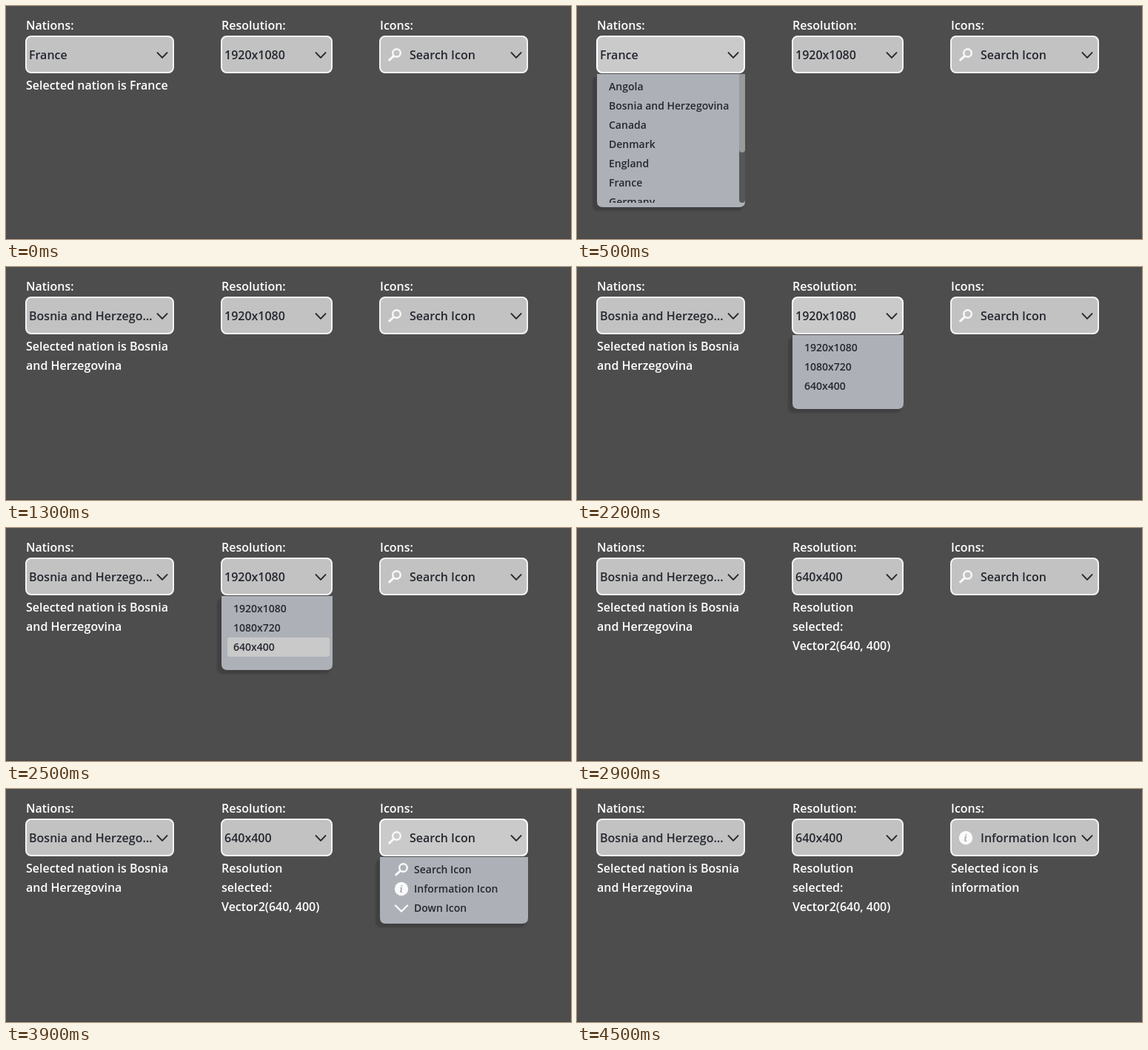
Recreate the animation shown at these times as an HTML page. Size 763 by 315 pixels, loop 6000 ms.

```html
<!DOCTYPE html>
<html lang="en">
<head>
<meta charset="utf-8">
<title>Option buttons</title>
<style>
  html, body { margin: 0; width: 100%; height: 100%; overflow: hidden; background: #4d4d4d; }
  svg { display: block; }
  text { font: 600 16px "Open Sans", sans-serif; fill: #fff; white-space: pre; }
  .dark { fill: #24282f; }
  .item { font-size: 14px; }
  .info { font: italic 700 13px "Noto Serif", serif; fill: #adb1b7; }
</style>
</head>
<body>
<svg id="stage" width="763" height="315" viewBox="0 0 763 315">
  <defs>
    <filter id="soft" x="-10%" y="-10%" width="120%" height="120%"><feGaussianBlur stdDeviation="1.2"/></filter>
    <clipPath id="list"><rect x="0" y="92" width="763" height="174"/></clipPath>
  </defs>
  <rect width="763" height="315" fill="#4d4d4d"/>
  <rect y="314" width="763" height="1" fill="#494445"/>
  <g id="scene"></g>
</svg>
<script>
const LOOP = 6000;
const ROW = 26;
const scene = document.getElementById('scene');

const text = (x, y, s, cls = '') => `<text x="${x}" y="${y}" class="${cls}">${s}</text>`;

const chevron = (x, y, w, h, color, weight) =>
  `<path d="M${x - w} ${y - h}L${x} ${y + h}L${x + w} ${y - h}" fill="none" stroke="${color}" ` +
  `stroke-width="${weight}" stroke-linecap="round" stroke-linejoin="round"/>`;

// Icons are centred on (x, y).
const icons = {
  search: (x, y) => `<g fill="none" stroke="#fafafa" stroke-linecap="round">
    <circle cx="${x + 2.5}" cy="${y - 2.5}" r="5.3" stroke-width="2.4"/>
    <path d="M${x - 1.8} ${y + 1.8}L${x - 7.3} ${y + 7}" stroke-width="3"/></g>`,
  info: (x, y) => `<circle cx="${x}" cy="${y}" r="9.2" fill="#fafafa"/>` + text(x - 2.8, y + 4.8, 'i', 'info'),
  down: (x, y) => chevron(x, y + 0.5, 8, 4, '#fafafa', 2.4)
};

function button(x, w, look, label, icon) {
  const hover = look === 'hover';
  return `<rect x="${x}" y="41" width="${w - 1}" height="49" rx="7" fill="${hover ? '#cacaca' : '#c2c2c2'}" ` +
    `stroke="${hover ? '#fff' : '#f3f3f3'}" stroke-width="2"/>` +
    (icon ? icons[icon](x + 20, 66) : '') +
    text(x + (icon ? 40 : 4), 72, label, 'dark') +
    chevron(x + w - 16, 66.5, 6.5, 3.4, '#26292e', 2);
}

function popup(x, w, h, items, active, scrolls) {
  const inner = scrolls ? w - 8 : w;
  const bottom = 92 + h;
  let out = `<rect x="${x - 6}" y="95" width="${w + 3}" height="${h + 2}" rx="8" fill="#3f3f3f" filter="url(#soft)"/>
    <path d="M${x} 92h${w}V${bottom - 8}q0 8 -8 8H${x + 8}q-8 0 -8 -8z" fill="#adb1b7"/>`;
  if (active >= 0) {
    out += `<rect x="${x + 8}" y="${96 + ROW * active}" width="${inner - 12}" height="${ROW}" rx="3" fill="#c9c9c9"/>`;
  }
  const rows = items.map(({ label, icon }, i) =>
    (icon ? icons[icon](x + 29, 109 + ROW * i) : '') +
    text(x + (icon ? 46 : 16), 114 + ROW * i, label, 'dark item'));
  out += `<g${scrolls ? ' clip-path="url(#list)"' : ''}>${rows.join('')}</g>`;
  if (scrolls) {
    out += `<path d="M${x + inner} 92h8V262q0 4 -4 4t-4 -4z" fill="#565758"/>
      <path d="M${x + inner} 92h8V194q0 4 -4 4t-4 -4z" fill="#999a9a"/>`;
  }
  return out;
}

const plain = label => ({ label });
const nations = ['Angola', 'Bosnia and Herzegovina', 'Canada', 'Denmark', 'England', 'France', 'Germany'].map(plain);
const sizes = ['1920x1080', '1080x720', '640x400'].map(plain);
const symbols = [
  { label: 'Search Icon', icon: 'search' },
  { label: 'Information Icon', icon: 'info' },
  { label: 'Down Icon', icon: 'down' }
];

// Value of the last [start, value] step reached at time t.
const at = (t, steps) => steps.reduce((value, [start, next]) => t >= start ? next : value, undefined);

const menus = [
  {
    x: 27, w: 200, h: 180, title: 'Nations:', items: nations, scrolls: true,
    look: [[0, ''], [200, 'hover'], [700, '']],
    open: [500, 1300],
    active: [[0, -1], [700, 3], [800, 4], [900, 2], [1000, 1]],
    choice: [[0, plain('France')], [1300, plain('Bosnia and Herzego…')]],
    note: [[0, ['Selected nation is France']], [1300, ['Selected nation is Bosnia', 'and Herzegovina']]]
  },
  {
    x: 291, w: 150, h: 100, title: 'Resolution:', items: sizes,
    look: [[0, ''], [1900, 'hover'], [2400, '']],
    open: [2200, 2800],
    active: [[0, -1], [2400, 1], [2500, 2]],
    choice: [[0, sizes[0]], [2800, sizes[2]]],
    note: [[0, []], [2900, ['Resolution', 'selected:', 'Vector2(640, 400)']]]
  },
  {
    x: 505, w: 200, h: 90, title: 'Icons:', items: symbols,
    look: [[0, ''], [3500, 'hover'], [3800, ''], [3900, 'hover'], [4100, '']],
    open: [3900, 4500],
    active: [[0, -1], [4100, 0], [4200, 1]],
    choice: [[0, symbols[0]], [4500, symbols[1]]],
    note: [[0, []], [4500, ['Selected icon is', 'information']]]
  }
];

function menu(m, t) {
  const isOpen = t >= m.open[0] && t < m.open[1];
  const choice = at(t, m.choice);
  const below = isOpen
    ? popup(m.x, m.w, m.h, m.items, at(t, m.active), m.scrolls)
    : at(t, m.note).map((line, i) => text(m.x, 113 + ROW * i, line)).join('');
  return text(m.x, 32, m.title) + below + button(m.x, m.w, at(t, m.look), choice.label, choice.icon);
}

let shown = '';
function draw(t) {
  const markup = menus.map(m => menu(m, t)).join('');
  if (markup !== shown) scene.innerHTML = shown = markup;
}

const start = performance.now();
function tick() {
  draw((performance.now() - start) % LOOP);
  requestAnimationFrame(tick);
}
tick();
</script>
</body>
</html>
```
